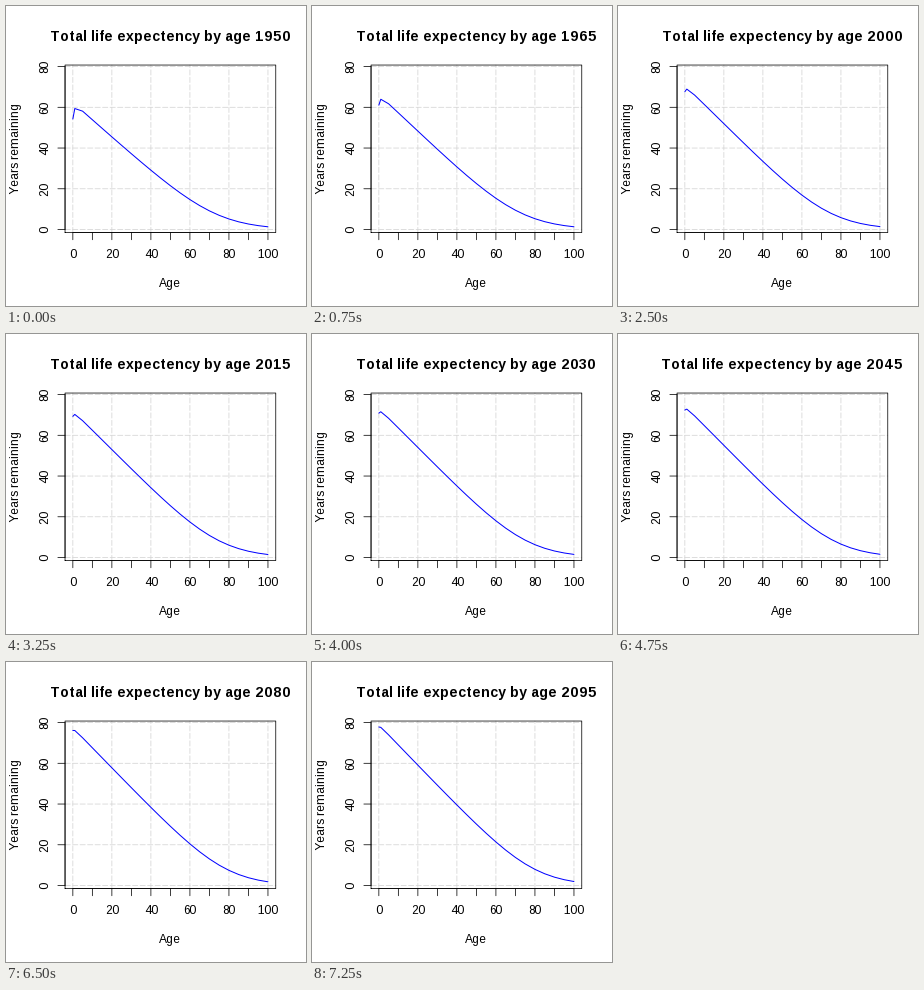
Write a matplotlib script that moves like this. It is 300 px wide and 300 px high and loops after 7.5 s.

```python
import numpy as np
import matplotlib.pyplot as plt
from matplotlib.animation import FuncAnimation

SIZE, DPI = 300, 100
PX = 72 / DPI                      # points per pixel
LINE = 14.4                        # margin line height in pixels
LEFT, RIGHT, TOP, BOTTOM = 59.04, 269.76, 59.04, 226.56
MID_X, MID_Y = (LEFT + RIGHT) / 2, (TOP + BOTTOM) / 2
X_RANGE = (-4, 104)
Y_RANGE = (-1.496, 80.746)
AGES = np.concatenate([[0, 1], np.arange(5, 101, 5)])

# Whole-pixel glyph advances without kerning
plt.rcParams.update({"font.family": "Liberation Sans",
                     "text.hinting_factor": 1,
                     "text.kerning_factor": 6})


def decline(age, slope, end, width):
    """Straight fall that levels off smoothly around the end age."""
    return slope * width * np.log1p(np.exp((end - age) / width))


def progress(year):
    """Share of the whole improvement reached by a year."""
    return np.interp(year, [1950, 1965, 1980, 2000, 2065, 2095],
                     [0, 0.23, 0.41, 0.5, 0.82, 1])


def remaining(year):
    p = progress(year)
    first = decline(AGES, 0.85, 73.3, 13)
    last = decline(AGES, 0.995, 79.3, 12)
    share = p ** (1 + (AGES / 77) ** 2)      # old ages improve later
    infant_loss = 8.1 * np.exp(-2 * p - 1.35 * AGES)
    return first + (last - first) * share - infant_loss


def to_x(age):
    return LEFT + (age - X_RANGE[0]) / (X_RANGE[1] - X_RANGE[0]) * (RIGHT - LEFT)


def to_y(years):
    return BOTTOM - (years - Y_RANGE[0]) / (Y_RANGE[1] - Y_RANGE[0]) * (BOTTOM - TOP)


fig = plt.figure(figsize=(SIZE / DPI, SIZE / DPI), dpi=DPI, facecolor="white")
ax = fig.add_axes([0, 0, 1, 1])
ax.set_xlim(0, SIZE)
ax.set_ylim(SIZE, 0)
ax.axis("off")


def stroke(xs, ys, color="black", width=0.75, **style):
    line, = ax.plot(xs, ys, color=color, lw=width * PX, snap=False,
                    solid_capstyle="round", solid_joinstyle="round", **style)
    return line


def label(x, y, text, size=12, **style):
    return ax.text(x, y, text, size=size * PX, ha="center", va="baseline",
                   rotation_mode="anchor", **style)


# Grid
longdash = dict(color="lightgray", linestyle=(0, (7, 3)),
                dash_capstyle="round")
for age in range(0, 101, 20):
    stroke([to_x(age)] * 2, [BOTTOM, TOP], **longdash)
for years in range(0, 81, 20):
    stroke([LEFT, RIGHT], [to_y(years)] * 2, **longdash)

curve = stroke([], [], "blue", width=1)

# Axes and frame
stroke([to_x(0), to_x(100)], [BOTTOM] * 2)
for age in range(0, 101, 10):
    stroke([to_x(age)] * 2, [BOTTOM, BOTTOM + LINE / 2])
    if age % 20 == 0:
        label(to_x(age), BOTTOM + 1.8 * LINE, str(age))
stroke([LEFT] * 2, [to_y(0), to_y(80)])
for years in range(0, 81, 20):
    stroke([LEFT, LEFT - LINE / 2], [to_y(years)] * 2)
    label(LEFT - 1.2 * LINE, to_y(years), str(years), rotation=90)
stroke([LEFT, RIGHT, RIGHT, LEFT, LEFT], [BOTTOM, BOTTOM, TOP, TOP, BOTTOM])

label(MID_X, BOTTOM + 3.8 * LINE, "Age")
label(LEFT - 3.2 * LINE, MID_Y, "Years remaining", rotation=90)
title = label(MID_X, 34.8, "", size=14.4, weight="bold")


def draw(i):
    year = 1950 + 5 * i
    curve.set_data(to_x(AGES), to_y(remaining(year)))
    title.set_text(f"Total life expectency by age {year}")
    return curve, title


anim = FuncAnimation(fig, draw, frames=30, interval=250, repeat=True,
                     repeat_delay=0)
plt.show()
```
